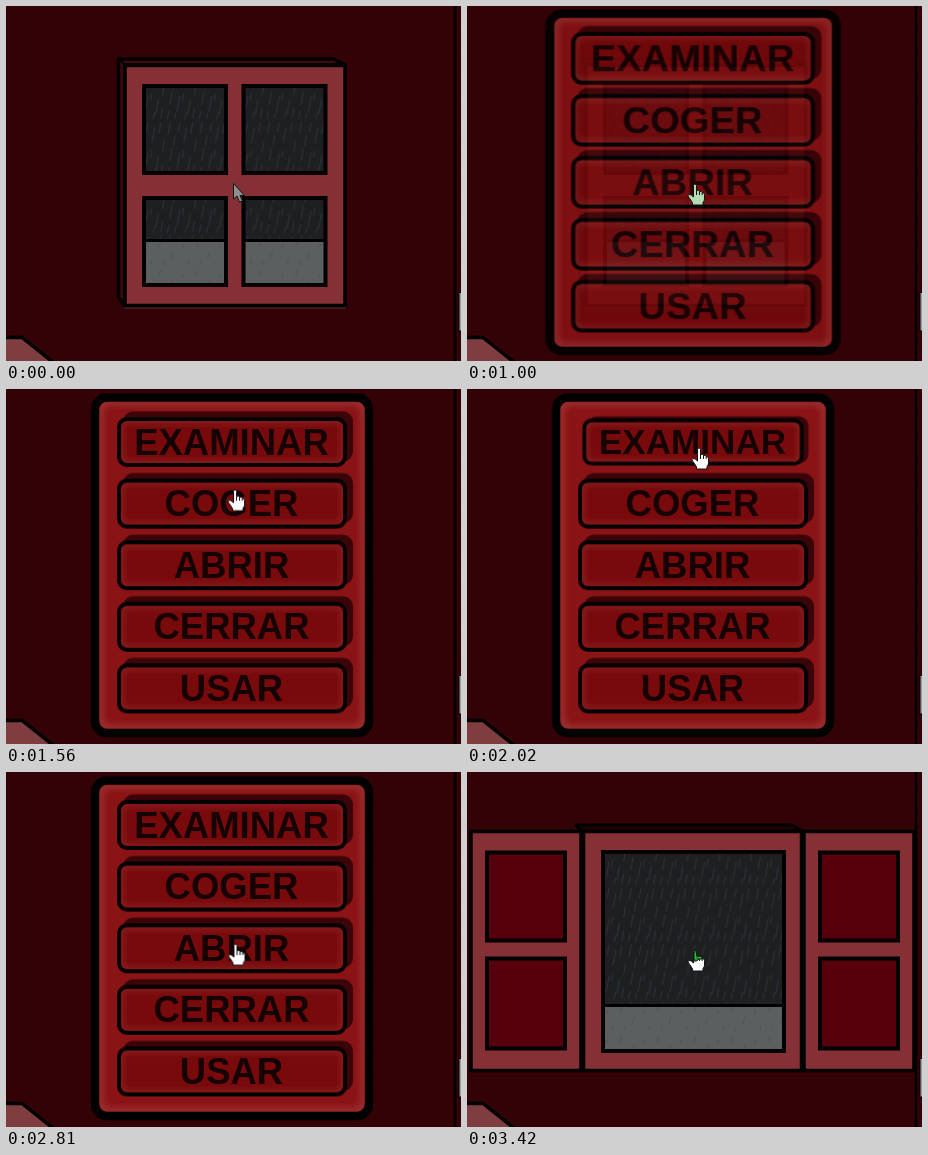
An HTML page without scripts for the animation above (4620 ms loop, 455 by 355 pixels).

```html
<!DOCTYPE html>
<html lang="es">
<head>
<meta charset="utf-8">
<title>Ventana</title>
<style>
html, body { margin: 0; width: 100%; height: 100%; overflow: hidden; background: #330206; }
svg { display: block; width: 100%; height: 100%; }
text { font: bold 36.5px "Liberation Sans", Arial, sans-serif; text-anchor: middle; fill: #150103; }

.anim { animation: 4620ms linear infinite; }
.frame { fill: #843034; stroke: #000; stroke-width: 3.5; }
.hole { fill: #56000b; stroke: #000; stroke-width: 4; }
.edge { fill: none; stroke: #000; stroke-width: 4; }
.snow { fill: #5c5f5f; }

/* window states */
.closed { animation-name: closed; }
.open { animation-name: open; }
@keyframes closed { 0%, 64.06% { visibility: visible } 64.07%, 100% { visibility: hidden } }
@keyframes open { 0%, 64.06% { visibility: hidden } 64.07%, 100% { visibility: visible } }

/* menu fade and button pulse */
.menu { transform-origin: 226px 176px; filter: blur(.5px); animation-name: menu; }
@keyframes menu {
  0%, 15.5% { opacity: 0; transform: scale(1.05, 1.006) }
  21.65% { opacity: .88; transform: scale(1.046, 1.006) }
  25.97%, 63.6% { opacity: 1; transform: none }
  69.7% { opacity: .76; transform: scale(1.025, 1.004) }
  74.02%, 100% { opacity: 0; transform: scale(1.05, 1.006) }
}
.plate { transform-origin: 226px 53px; animation-name: plate; }
@keyframes plate {
  0%, 21.65% { transform: scale(1.014, 1.05) }
  25.97%, 63.6% { transform: none }
  69.7%, 100% { transform: scale(1.006, 1.02) }
}
.pulse { transform-origin: 226px 53px; animation-name: pulse; }
@keyframes pulse {
  0%, 42% { transform: none }
  43.5%, 44.4% { transform: scale(.962, .94) }
  46.97%, 100% { transform: none }
}
.sink { animation-name: sink; }
@keyframes sink {
  0%, 42% { transform: none }
  43.5%, 44.4% { transform: translate(-1px, 3px) }
  46.97%, 100% { transform: none }
}

/* pointer */
.pointer { animation-name: move; }
@keyframes move {
  0%, 30.5% { transform: translate(228px, 178px) }
  33.77% { transform: translate(229px, 101px) }
  37% { transform: translate(231px, 48px) }
  39% { transform: translate(232px, 51px) }
  42%, 51.5% { transform: translate(232px, 59px) }
  56% { transform: translate(231.5px, 126px) }
  60.82% { transform: translate(229.5px, 172px) }
  63%, 100% { transform: translate(228px, 178px) }
}
.arrow { animation-name: arrow; }
@keyframes arrow { 0%, 16% { visibility: visible } 16.02%, 100% { visibility: hidden } }
.hand { stroke: #111; animation-name: hand; }
@keyframes hand {
  0%, 16% { visibility: hidden; fill: #b4dcb4 }
  16.02%, 30.9% { visibility: visible; fill: #b4dcb4 }
  30.95%, 100% { visibility: visible; fill: #fff }
}
</style>
</head>
<body>
<svg viewBox="0 0 455 355" preserveAspectRatio="none">
  <defs>
    <pattern id="rain" width="53" height="67" patternUnits="userSpaceOnUse" patternTransform="scale(.6 .85)">
      <rect width="53" height="67" fill="#1d1f20"/>
      <path stroke="#28313a" stroke-width="1.8" d="M5 17l4-15M14 30l3-12M22 14l3-11M31 27l5-18M43 16l3-13M49 38l3-14M8 49l4-16M20 58l5-19M29 45l2-9M38 60l4-17M46 65l3-12M4 66l3-10M16 66l2-7M33 66l3-8"/>
    </pattern>
    <pattern id="drops" width="37" height="29" patternUnits="userSpaceOnUse">
      <path stroke="#505455" d="M5 9l2-6M17 20l2-7M28 11l2-5M34 26l1-5M9 27l1-4"/>
    </pattern>
    <filter id="soft"><feGaussianBlur stdDeviation="3.5"/></filter>
    <clipPath id="panelClip"><rect x="89" y="8" width="274" height="336" rx="12"/></clipPath>
    <clipPath id="btnClip"><rect x="113" y="30" width="226" height="46" rx="8"/></clipPath>

    <g id="upper">
      <rect x="138" y="80" width="82" height="87" fill="url(#rain)"/>
      <rect x="138" y="80" width="82" height="87" class="edge"/>
    </g>
    <g id="lower">
      <rect x="138" y="192" width="82" height="87" fill="url(#rain)"/>
      <path class="snow" d="M138 235h82v44h-82z"/>
      <path fill="url(#drops)" d="M138 235h82v44h-82z"/>
      <path stroke="#000" stroke-width="3" d="M138 234.500h82"/>
      <rect x="138" y="192" width="82" height="87" class="edge"/>
    </g>
    <g id="shutter">
      <rect x="4" y="59.500" width="110" height="239" class="frame"/>
      <rect x="20" y="80.500" width="78" height="88" class="hole"/>
      <rect x="20" y="186.500" width="78" height="90" class="hole"/>
    </g>

    <rect id="shade" x="117" y="22.500" width="230" height="50" rx="10" fill="#3a0408"/>
    <g id="face">
      <rect x="113" y="30" width="226" height="46" rx="8" fill="#780a0c"/>
      <g clip-path="url(#btnClip)">
        <rect x="114" y="31" width="224" height="44" rx="8" fill="none" stroke="#8e2628" stroke-width="5" filter="url(#soft)"/>
      </g>
      <rect x="113" y="30" width="226" height="46" rx="8" fill="none" stroke="#000" stroke-width="3.800"/>
    </g>
    <g id="plate">
      <use href="#shade"/>
      <use href="#face"/>
    </g>
  </defs>

  <!-- room -->
  <rect width="455" height="355" fill="#330206"/>
  <path stroke="#000" stroke-width="2.500" d="M449 0v355"/>
  <path stroke="#000" stroke-opacity=".5" stroke-dasharray="3 3" d="M450.500 0v355"/>
  <path fill="#9c9c9c" stroke="#000" d="M456 286.500H453V325H456"/>
  <path fill="#803d40" stroke="#000" stroke-width="3.500" d="M-4 331.500H16L48 357H-4z"/>

  <g class="anim closed">
    <path fill="#3f0a0e" stroke="#000" stroke-width="3.500" stroke-linejoin="round" d="M112.500 53H328L339 59H119V300L112.500 291z"/>
    <path stroke="#000" stroke-width="2" d="M113 53l6 6"/>
    <rect x="119" y="59.500" width="220" height="240" class="frame"/>
    <path stroke="#4a3033" d="M118 302h222"/>
    <use href="#upper"/>
    <use href="#upper" x="99.500"/>
    <use href="#lower"/>
    <use href="#lower" x="99.500"/>
  </g>

  <g class="anim open">
    <path fill="#1d0205" stroke="#000" stroke-width="3" stroke-linejoin="round" d="M109 53H325L335 59H114z"/>
    <use href="#shutter"/>
    <use href="#shutter" x="333"/>
    <rect x="116.500" y="59.500" width="218" height="239" class="frame"/>
    <rect x="136" y="80" width="181" height="199" fill="url(#rain)"/>
    <path class="snow" d="M136 234h181v45H136z"/>
    <path fill="url(#drops)" d="M136 234h181v45H136z"/>
    <path stroke="#000" stroke-width="3" d="M136 233.500h181"/>
    <rect x="136" y="80" width="181" height="199" class="edge"/>
  </g>

  <g class="anim menu">
    <rect x="89" y="8" width="274" height="336" rx="12" fill="#8a1315"/>
    <g clip-path="url(#panelClip)">
      <rect x="94" y="13" width="264" height="326" rx="9" fill="none" stroke="#a23a3b" stroke-width="5" filter="url(#soft)"/>
    </g>
    <rect x="89" y="8.500" width="274" height="335.500" rx="12" fill="none" stroke="#000" stroke-width="8.500"/>

    <g>
      <g class="anim plate">
        <g class="anim sink"><use href="#shade" class="anim pulse"/></g>
        <use href="#face" class="anim pulse"/>
      </g>
      <text x="225.500" y="65.500" class="anim pulse">EXAMINAR</text>
    </g>
    <g transform="translate(0 61.600)">
      <g class="anim plate"><use href="#plate"/></g>
      <text x="225.500" y="65.500">COGER</text>
    </g>
    <g transform="translate(0 123.200)">
      <g class="anim plate"><use href="#plate"/></g>
      <text x="225.500" y="65.500">ABRIR</text>
    </g>
    <g transform="translate(0 184.800)">
      <g class="anim plate"><use href="#plate"/></g>
      <text x="225.500" y="65.500">CERRAR</text>
    </g>
    <g transform="translate(0 246.400)">
      <g class="anim plate"><use href="#plate"/></g>
      <text x="225.500" y="65.500">USAR</text>
    </g>
  </g>

  <g class="anim pointer">
    <path class="anim arrow" fill="#8f8f8f" stroke="#151515" d="M-.5-.5V15L3 12L5.500 18L8.500 17L6 11.500H10.500z"/>
    <path class="anim hand" d="M-1.500 1.500Q-1.500 0 0 0T1.500 1.500V6.500Q4 5.800 4.500 7.500Q6.500 6.800 7.200 8.500Q9.500 8.500 9.500 10.500V15Q9.500 17 8 18.500V21H-2.500V19Q-4 16 -6.500 13Q-7.500 11 -6 10.500Q-4 10 -1.500 13zM1.500 6.500V11M4.500 7.500V11M7.200 8.500V11"/>
    <g class="anim open">
      <path fill="#1f8f2c" stroke="#10200f" d="M-1 0L1.500 1.500V6L7 6.500V9H4L1.500 11H-.8z"/>
      <path stroke="#35c343" d="M.3 3v6M4 7.500h2"/>
    </g>
  </g>
</svg>
</body>
</html>
```
